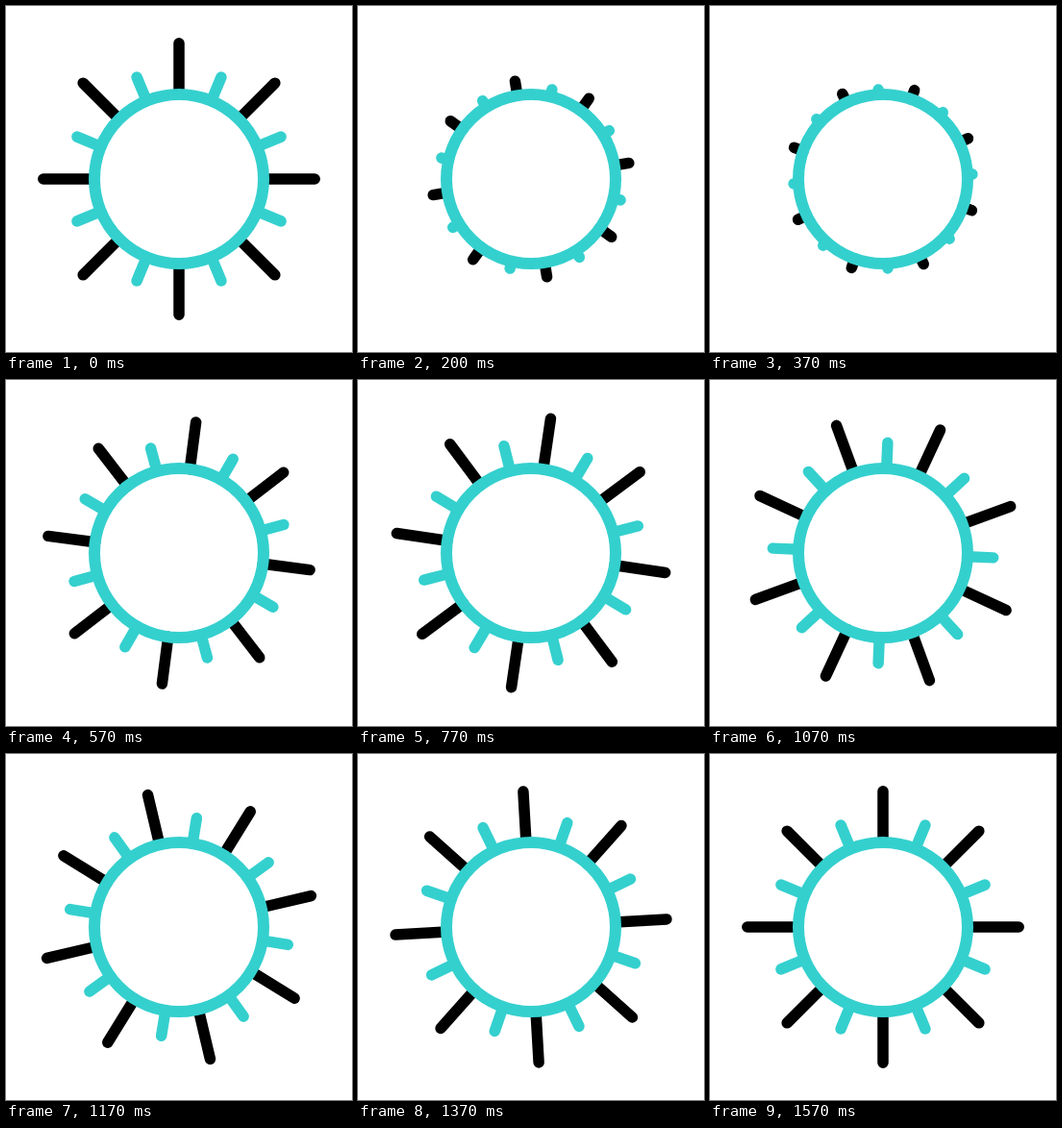
Write an HTML page with a canvas that moves like this. It is 360 px wide and 360 px high and loops after 1.67 s.

```html
<!DOCTYPE html>
<html>
<head>
<meta charset="utf-8">
<style>
html, body { margin: 0; overflow: hidden; background: #fff; }
canvas { display: block; }
</style>
</head>
<body>
<canvas id="stage" width="360" height="360"></canvas>
<script>
const ctx = document.getElementById('stage').getContext('2d');
const LOOP = 1670, STEP = 33.4, LAST = 47;
const TEAL = '#34d0ce', RING = 88;
const TURN = -38.5, TURN_AT = 640, SHORT = 0.1, SHORT_AT = 300;

// Cubic bezier easing (0.37, 0, 0.56, 1), solved by bisection
function ease(x) {
  if (x <= 0) return 0;
  if (x >= 1) return 1;
  let lo = 0, hi = 1, s;
  for (let i = 0; i < 24; i++) {
    s = (lo + hi) / 2;
    const bx = 3 * s * (1 - s) ** 2 * 0.37 + 3 * s * s * (1 - s) * 0.56 + s ** 3;
    if (bx < x) lo = s; else hi = s;
  }
  return s * s * (3 - 2 * s);
}

// Rises 0 to 1 until peak, then falls back to 0 at end
const thereAndBack = (t, peak, end) =>
  t < peak ? ease(t / peak) : 1 - ease((t - peak) / (end - peak));

function rays(color, length, offset, turn) {
  ctx.strokeStyle = color;
  ctx.lineWidth = 11.5;
  ctx.beginPath();
  for (let i = 0; i < 8; i++) {
    const a = (i * 45 + offset + turn) * Math.PI / 180;
    const c = Math.cos(a), s = Math.sin(a);
    ctx.moveTo(RING * c, RING * s);
    ctx.lineTo((RING + length) * c, (RING + length) * s);
  }
  ctx.stroke();
}

function draw(now) {
  const step = Math.min(LAST, Math.floor((now % LOOP + 5) / STEP));
  const t = step * STEP;
  const turn = TURN * thereAndBack(t, TURN_AT, LAST * STEP);
  const size = 1 - (1 - SHORT) * thereAndBack(t, SHORT_AT, TURN_AT);

  ctx.setTransform(1, 0, 0, 1, 0, 0);
  ctx.fillStyle = '#fff';
  ctx.fillRect(0, 0, 360, 360);
  ctx.translate(180, 180);
  ctx.lineCap = 'round';
  rays('#000', 53.2 * size, 0, turn);
  rays(TEAL, 26.8 * size, 22.5, turn);
  ctx.lineWidth = 12;
  ctx.beginPath();
  ctx.arc(0, 0, RING, 0, 2 * Math.PI);
  ctx.stroke();
}

const start = performance.now();
function tick() {
  draw(performance.now() - start);
  requestAnimationFrame(tick);
}
tick();
</script>
</body>
</html>
```
